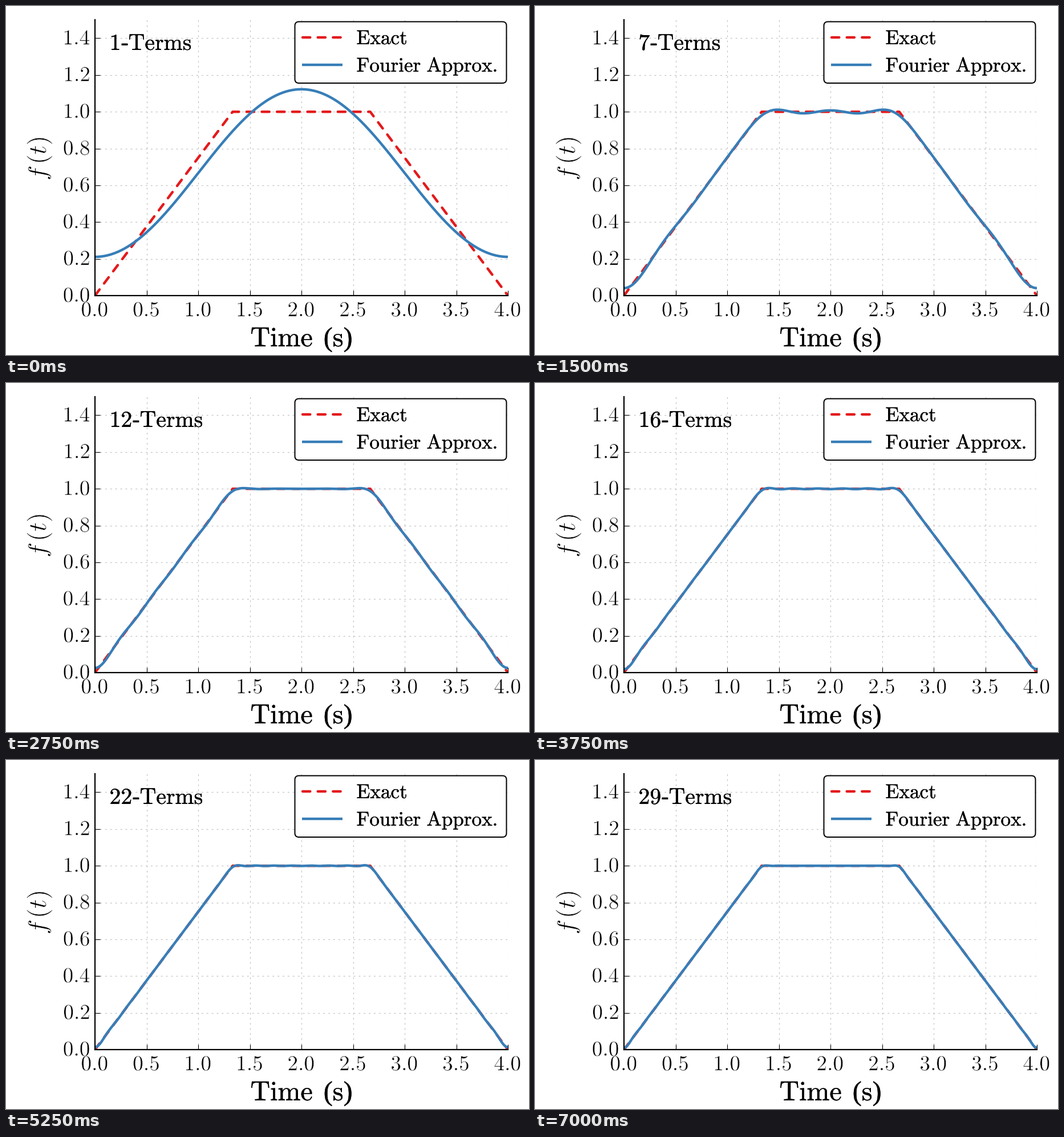
These frames come from a looping animation (917x611 px, 7500 ms). A matplotlib script:

```python
import numpy as np
import matplotlib.pyplot as plt
from matplotlib.animation import FuncAnimation
from matplotlib.patches import FancyBboxPatch
from matplotlib.patheffects import Stroke, withStroke

W, H, DPI = 917, 611, 160
LEFT, RIGHT, TOP, BOTTOM = 156, 880, 24.3, 507
RED, BLUE = "#e41a1c", "#377eb8"
PERIOD, RAMP = 4, 4 / 3
STEPS, MAX_TERMS = 30, 29

plt.rcParams.update({
    "mathtext.fontset": "cm",
    "font.family": "Liberation Serif",
    "lines.scale_dashes": False,
    "lines.dash_capstyle": "round",
})

# Glyph weight: a thin black outline thickens, a white one slims
BOLD = [withStroke(linewidth=0.14, foreground="black")]
SLIM = [Stroke(linewidth=0.22, foreground="white")]


def rm(text):
    return r"$\mathrm{" + text.replace(" ", r"\ ") + "}$"


def fourier(t, terms):
    """Partial Fourier sum of the trapezoid."""
    total = np.full_like(t, 2 / 3)
    for n in range(1, terms + 1):
        w = 2 * np.pi * n / PERIOD
        total += (np.cos(w * RAMP) - 1) / (RAMP * w**2) * np.cos(w * t)
    return total


def title(terms):
    return rm(str(terms)) + "-" + rm("Terms")


fig = plt.figure(figsize=(W / DPI, H / DPI), dpi=DPI, facecolor="white")

# Plot area
ax = fig.add_axes([LEFT / W, 1 - BOTTOM / H,
                   (RIGHT - LEFT) / W, (BOTTOM - TOP) / H])
ax.set(xlim=(0, PERIOD), ylim=(0, 1.5))
x_ticks = np.arange(0, 4.1, 0.5)
y_ticks = np.arange(0, 1.5, 0.2)
ax.set_xticks(x_ticks)
ax.set_yticks(y_ticks)
ax.tick_params(direction="in", length=4, width=0.5,
               labelleft=False, labelbottom=False)
ax.spines[["top", "right"]].set_visible(False)
ax.spines[["left", "bottom"]].set_linewidth(1)
ax.set_axisbelow(True)
ax.grid(color="#bcbebe", linewidth=0.5, linestyle=(0, (1, 3)),
        dash_capstyle="round")

ax.plot([0, RAMP, PERIOD - RAMP, PERIOD], [0, 1, 1, 0], color=RED,
        lw=2, linestyle=(0, (6, 6)))
t = np.linspace(0, PERIOD, 1001)
curve, = ax.plot(t, fourier(t, 1), color=BLUE, lw=2)

# Overlay in pixel coordinates for text and legend
page = fig.add_axes([0, 0, 1, 1])
page.set(xlim=(0, W), ylim=(H, 0))
page.axis("off")


def label(x, y, text, size, weight, ha="left", **kw):
    return page.text(x, y, text, fontsize=size, ha=ha, va="baseline",
                     color="black", path_effects=weight, **kw)


for v in x_ticks:
    x = LEFT - 0.5 + v * (RIGHT - LEFT) / PERIOD
    label(x, 543.3, f"${v:.1f}$", 16.8, SLIM, "center")
for v in y_ticks:
    y = BOTTOM - v * (BOTTOM - TOP) / 1.5
    label(148, y + 10.9, f"${v:.1f}$", 16.8, SLIM, "right")

label(518, 596, rm("Time") + r"$\,$ (" + rm("s") + ")", 21.6, BOLD, "center")
label(70, 305.5, r"$f\,(t)$", 20, SLIM, rotation=90, rotation_mode="anchor")
terms_text = label(181.5, 77, title(1), 17.9, BOLD)

page.add_patch(FancyBboxPatch(
    (506.5, 27.5), 371, 107.5, boxstyle="round,pad=0,rounding_size=7",
    facecolor="white", edgecolor="black", linewidth=0.9))
page.plot([519.5, 590], [55, 55], color=RED, lw=2, linestyle=(0, (6, 6)))
page.plot([518.5, 589.5], [103, 103], color=BLUE, lw=2,
          solid_capstyle="butt")
label(614.5, 67, rm("Exact"), 15.8, BOLD)
label(614.5, 115, rm("Fourier Approx."), 15.8, BOLD)


def update(step):
    terms = min(step + 1, MAX_TERMS)
    curve.set_ydata(fourier(t, terms))
    terms_text.set_text(title(terms))
    return curve, terms_text


anim = FuncAnimation(fig, update, frames=STEPS, interval=250, repeat=True)
plt.show()
```
